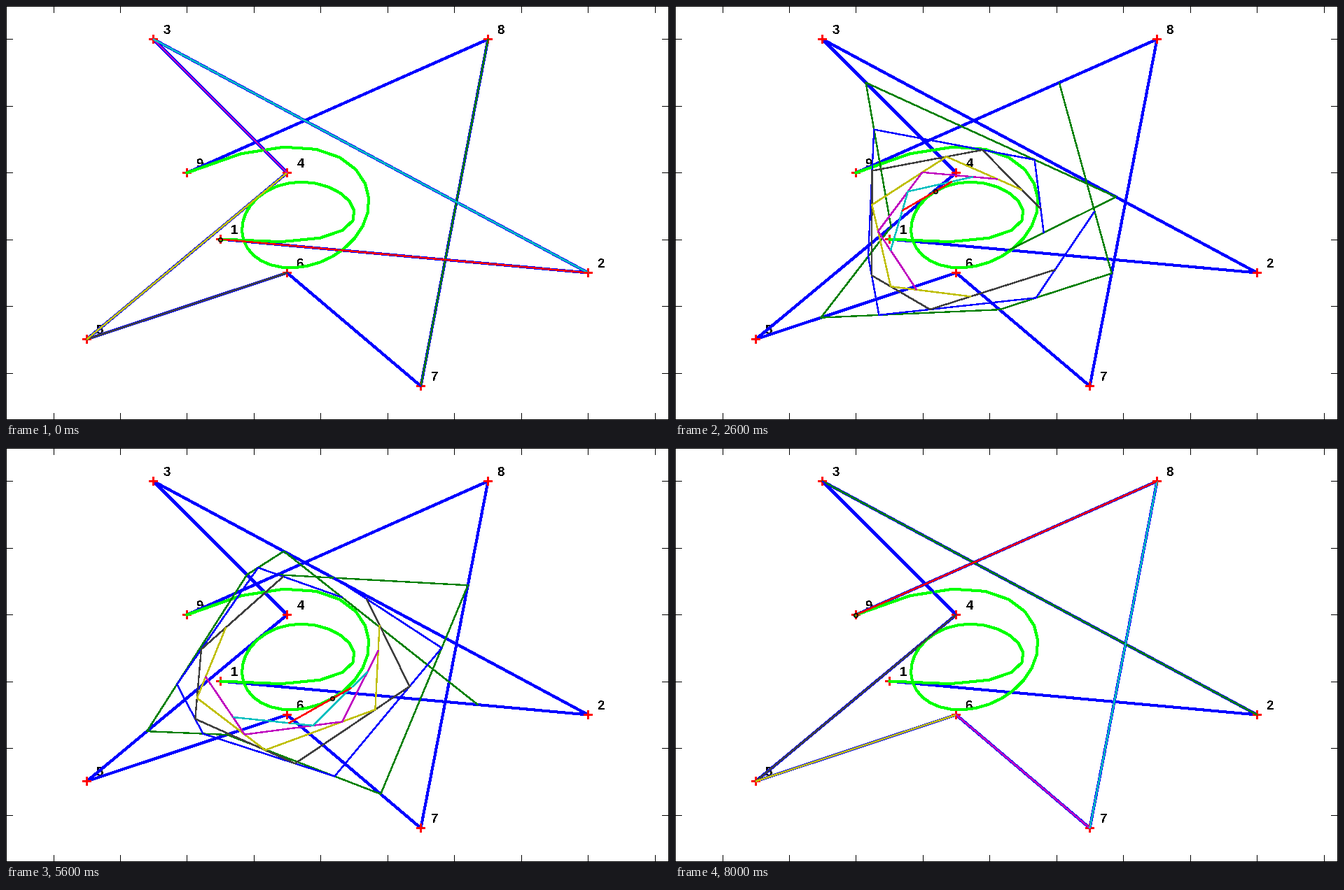
A matplotlib script that plays this animation: 947 px wide and 592 px high, repeating every 8.2 s.

```python
import numpy as np
import matplotlib.pyplot as plt
from matplotlib.animation import FuncAnimation

W, H, DPI = 947, 592, 64
STEPS = 40
PX = 72 / DPI  # one pixel in points
UNIT, X0, Y0 = 95.45, 67.6, 47.3
THICK, THIN = 3, 1.33

# Control points in grid units, y pointing down
GRID = np.array([(2.5, 3), (8, 3.5), (1.5, 0), (3.5, 2), (0.5, 4.5),
                 (3.5, 3.5), (5.5, 5.2), (6.5, 0), (2, 2)])
CTRL = np.floor(GRID * UNIT + (X0, Y0)) + 0.5
COLORS = [(0, .5, 0), (0, 0, 1), (.25, .25, .25), (.75, .75, 0),
          (.75, 0, .75), (0, .75, .75), (1, 0, 0)]


def casteljau(t):
    """All interpolation levels, ending with the single curve point."""
    levels, pts = [], CTRL
    while len(pts) > 1:
        pts = (1 - t) * pts[:-1] + t * pts[1:]
        levels.append(pts)
    return levels


fig = plt.figure(figsize=(W / DPI, H / DPI), dpi=DPI, facecolor="white")
ax = fig.add_axes([0, 0, 1, 1])
ax.set_xlim(0, W)
ax.set_ylim(H, 0)
ax.axis("off")


def line(pts, color, width, z, **kw):
    x, y = np.transpose(pts)
    return ax.plot(x, y, color=color, lw=width * PX, zorder=z, snap=False,
                   antialiased=False, solid_joinstyle="round", **kw)[0]


def rule(x1, y1, x2, y2, color="black", width=1, z=9):
    line([(x1, y1), (x2, y2)], color, width, z, solid_capstyle="butt")


def draw_frame():
    for y in (0.5, H - 0.5):
        rule(0, y, W, y)
    for x in (0.5, W - 0.5):
        rule(x, 0, x, H)
    for i in range(10):
        x = round(X0 + i * UNIT) + 0.5
        rule(x, 0, x, 10)
        rule(x, H - 10, x, H)
    for i in range(6):
        y = round(Y0 + i * UNIT) + 0.5
        rule(0, y, 10, y)
        rule(W - 10, y, W, y)


def draw_static():
    for n, (x, y) in enumerate(CTRL, 1):
        ax.text(x + 14.3, y - 7.1, str(n), fontsize=18.67 * PX,
                family="Liberation Sans", weight="bold", color="black",
                va="baseline", ha="left", zorder=1, antialiased=False)
        rule(x - 6, y, x + 6, y, "red", 1.8, 3)
        rule(x, y - 6, x, y + 6, "red", 1.8, 3)
    line(CTRL, "blue", THICK, 2)
    curve = [casteljau(k / STEPS)[-1][0] for k in range(STEPS + 1)]
    line(curve, "lime", THICK, 4)


draw_frame()
draw_static()
webs = [line(CTRL[:2], c, THIN, 5 + i / 10, solid_capstyle="butt")
        for i, c in enumerate(COLORS)]
dot = line(CTRL[:1], "black", 1, 7, ls="none", marker="o",
           markersize=5.5 * PX, markerfacecolor="none",
           markeredgewidth=1.7 * PX)


def update(k):
    levels = casteljau(k / STEPS)
    for web, pts in zip(webs, levels):
        web.set_data(pts[:, 0], pts[:, 1])
    dot.set_data(levels[-1][:, 0], levels[-1][:, 1])
    return webs + [dot]


anim = FuncAnimation(fig, update, frames=STEPS + 1, interval=200,
                     repeat=True, repeat_delay=0, blit=False)
plt.show()
```
